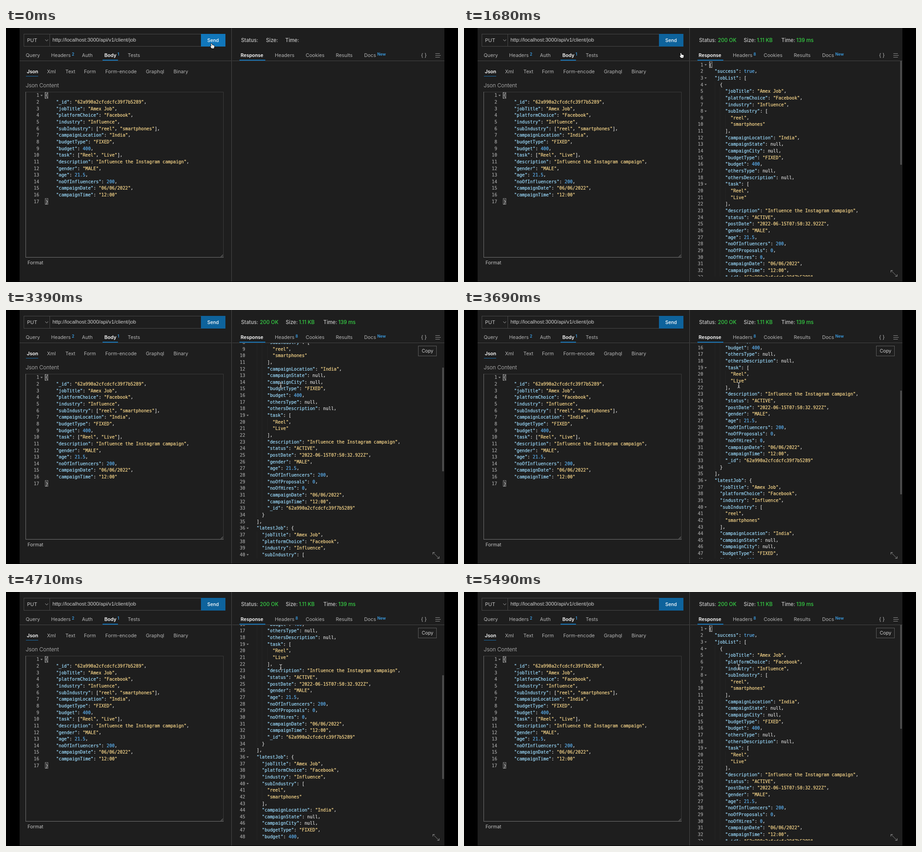
An HTML page with a canvas that plays this animation: 997x561 px, repeating every 5.97 s.

```html
<!DOCTYPE html>
<html lang="en">
<head>
<meta charset="utf-8">
<title>API client</title>
<style>
html, body { margin: 0; width: 100%; height: 100%; overflow: hidden; background: #000; }
canvas { display: block; width: 997px; height: 561px; }
</style>
</head>
<body>
<canvas id="stage" width="997" height="561"></canvas>
<script>
const ctx = document.getElementById('stage').getContext('2d');
const LOOP = 5970, STEP = 30, RESPONSE_AT = 1140;
const ROW = 14.655, CHAR = 5.87;
const UI = 'Inter, "Liberation Sans", sans-serif';
const MONO = '9.75px "DejaVu Sans Mono", monospace';
const BG = '#1e1e1e', BLUE = '#0e70b4', BADGE = '#3b9fe6', GREEN = '#36cf45';
const BUTTON = '#0e639c', BUTTON_HOVER = '#1177bb';
const KEY = '#9cdcfe', STRING = '#fbd98c', NUMBER = '#5cb0f0', PLAIN = '#dcdcdc';

const request = `{
    "_id": "62a990a2cfcdcfc39f7b5289",
    "jobTitle": "Amex Job",
    "platformChoice": "Facebook",
    "industry": "Influence",
    "subIndustry": ["reel", "smartphones"],
    "campaignLocation": "India",
    "budgetType": "FIXED",
    "budget": 400,
    "task": ["Reel", "Live"],
    "description": "Influence the Instagram campaign",
    "gender": "MALE",
    "age": 21.5,
    "noOfInfluencers": 200,
    "campaignDate": "06/06/2022",
    "campaignTime": "12:00"
}`.split('\n');

const job = {
  jobTitle: 'Amex Job', platformChoice: 'Facebook', industry: 'Influence',
  subIndustry: ['reel', 'smartphones'],
  campaignLocation: 'India', campaignState: null, campaignCity: null,
  budgetType: 'FIXED', budget: 400, othersType: null, othersDescription: null,
  task: ['Reel', 'Live'],
  description: 'Influence the Instagram campaign', status: 'ACTIVE',
  postDate: '2022-06-15T07:50:32.922Z', gender: 'MALE', age: 21.5,
  noOfInfluencers: 200, noOfProposals: 0, noOfHires: 0,
  campaignDate: '06/06/2022', campaignTime: '12:00',
  _id: '62a990a2cfcdcfc39f7b5289'
};
const response = JSON.stringify({ success: true, jobList: [job], latestJob: job }, null, 2).split('\n');

// [time, value...] points
const scrollPath = [[3060, 0], [3090, 2.4], [3240, 48], [3450, 138], [3690, 217.6], [3870, 262],
  [3960, 277], [4050, 283.7], [4380, 283.7], [4530, 268], [4710, 229.6], [4950, 128], [5190, 42], [5370, 8], [5490, 0]];
const pointerPath = [[1560, 455, 39.5], [1680, 480, 60.5], [1800, 526, 98], [1950, 584, 147], [2100, 606, 166]];

function along(path, t) {
  if (t <= path[0][0]) return path[0].slice(1);
  for (let i = 1; i < path.length; i++) {
    const a = path[i - 1], b = path[i];
    if (t <= b[0]) {
      const k = (t - a[0]) / (b[0] - a[0]);
      return a.slice(1).map((v, j) => v + (b[j + 1] - v) * k);
    }
  }
  return path[path.length - 1].slice(1);
}

function box(x, y, w, h, color) {
  ctx.fillStyle = color;
  ctx.fillRect(x, y, w, h);
}

function frame(x, y, w, h, color) {
  ctx.strokeStyle = color;
  ctx.lineWidth = 1;
  ctx.strokeRect(x, y, w, h);
}

function line(color, width, ...pts) {
  ctx.strokeStyle = color;
  ctx.lineWidth = width;
  ctx.beginPath();
  for (let i = 0; i < pts.length; i += 2) ctx.lineTo(pts[i], pts[i + 1]);
  ctx.stroke();
}

function text(str, x, y, color = '#b4b4b4', size = 10.8, weight = 400, family = UI) {
  ctx.font = `${weight} ${size}px ${family}`;
  ctx.fillStyle = color;
  ctx.fillText(str, x, y);
}

// Code text gets a hairline outline for a slightly heavier weight
function glyphs(str, x, y, color) {
  ctx.fillStyle = ctx.strokeStyle = color;
  ctx.lineWidth = 0.22;
  ctx.fillText(str, x, y);
  ctx.strokeText(str, x, y);
}

function colorOf(token, isKey) {
  if (isKey) return KEY;
  if (token[0] === '"') return STRING;
  return /^(\d|true)/.test(token) ? NUMBER : PLAIN;
}

function codeLine(str, x, y) {
  for (const m of str.matchAll(/"[^"]*"(?=(:?))|\d[\d.]*|[a-z]+|[^\w\s"]+/g)) {
    glyphs(m[0], x + m.index * CHAR, y, colorOf(m[0], m[1]));
  }
}

function editor(lines, x, y, gutter, foldable, top, bottom) {
  ctx.font = MONO;
  lines.forEach((str, i) => {
    const base = y + i * ROW;
    if (base < top - 5 || base > bottom + 12) return;
    ctx.textAlign = 'right';
    glyphs(i + 1, gutter, base, '#a3a3a3');
    ctx.textAlign = 'left';
    if (foldable(str)) {
      ctx.fillStyle = '#8c8c8c';
      ctx.beginPath();
      ctx.moveTo(gutter + 3, base - 4.6);
      ctx.lineTo(gutter + 8, base - 4.6);
      ctx.lineTo(gutter + 5.5, base - 1.6);
      ctx.fill();
    }
    codeLine(str, x, base);
  });
}

function bracketBox(x, y, caret) {
  frame(x, y, 6, 13, '#8a8a8a');
  if (caret) line('#e0e0e0', 1, x, y - 0.5, x, y + 13.5);
}

function badge(str, x) { text(str, x, 61, BADGE, 8.6, 600); }

function leftPane(hover) {
  frame(39.5, 13.5, 444, 27, '#484848');
  line('#484848', 1, 96.5, 13, 96.5, 41);
  text('PUT', 46.5, 31, '#c8c8c8', 11);
  line('#b0b0b0', 1, 86.5, 25.5, 89.8, 28.7, 93, 25.5);
  text('http://localhost:3000/api/v1/client/job', 102.5, 30, '#cecece', 11.45, 400, '"Liberation Sans", Arial, sans-serif');
  box(430, 13, 54, 28, hover ? BUTTON_HOVER : BUTTON);
  text('Send', 444, 30.7, '#fff', 10.4, 500);

  text('Query', 43.5, 64);
  text('Headers', 99.5, 64);
  badge('2', 145.3);
  text('Auth', 167.5, 64);
  text('Body', 217, 64, '#fff', 10.6, 600);
  badge('1', 246);
  text('Tests', 268.5, 64);
  box(30, 72, 467, 1, '#454545');
  box(213, 70, 34, 2, BLUE);

  text('Json', 46, 99.8, '#fff', 10.6, 600);
  text('Xml', 90.5, 99.8);
  text('Text', 131, 99.8);
  text('Form', 172, 99.8);
  text('Form-encode', 219, 99.8);
  text('Graphql', 308.5, 99.8);
  text('Binary', 369.5, 99.8);
  box(44, 106, 27, 1, '#1b6ca8');
  text('Json Content', 43.5, 131, '#c6c6c6', 11.8, 300);

  line('#3c3c3c', 1, 43, 141.5, 479.5, 141.5, 479.5, 507);
  line('#707070', 1, 43.5, 141, 43.5, 507);
  line('#747474', 1, 43, 506.5, 480, 506.5);
  line('#999', 0.8, 473.5, 505.5, 478.5, 500.5);
  line('#999', 0.8, 476, 505.5, 478.5, 503);
  bracketBox(86.5, 142.5, true);
  bracketBox(86.5, 376.5, false);
  editor(request, 87, 152.3, 73, s => s === '{', 141, 507);
  text('Format', 47.5, 521.6, '#c4c4c4', 10.5);
}

function stat(label, value, x, valueX) {
  text(label, x, 31, '#c6c6c6', 11.3, 500);
  if (value) text(value, valueX, 31, GREEN, 11.3, 500);
}

function rightPane(done) {
  stat('Status:', done && '200 OK', 518.5, 560);
  stat('Size:', done && '1.11 KB', done ? 617 : 573.5, 646);
  stat('Time:', done && '139 ms', done ? 700 : 616, 733);

  text('Response', 517.5, 64, '#fff', 10.5, 600);
  text('Headers', 593, 64);
  if (done) badge('8', 638.5);
  text('Cookies', 661, 64);
  text('Results', 727.5, 64);
  text('Docs', 790, 64);
  badge('New', 819);
  text('{ }', 915.5, 63.6, '#b8b8b8', 11);
  line('#8e8e8e', 1, 947, 56.5, 957, 56.5);
  line('#8e8e8e', 1, 947, 60.5, 959, 60.5);
  line('#8e8e8e', 1, 947, 64.5, 957, 64.5);
  box(499, 72, 468, 1, '#454545');
  box(515, 70, 57, 2, BLUE);
}

function results(scroll) {
  ctx.save();
  ctx.beginPath();
  ctx.rect(499, 73, 468, 476);
  ctx.clip();
  response.forEach((str, i) => {
    const depth = str.search(/\S/);
    for (let c = 2; c < depth; c += 2) box(Math.round(541 + c * CHAR), 73.5 + i * ROW - scroll, 1, ROW, '#252525');
  });
  bracketBox(541.5, 74.5 - scroll, true);
  editor(response, 541.1, 84.6 - scroll, 527.5, s => /[[{]$/.test(s), 73, 549);
  ctx.restore();
  box(962, 73 + scroll * 0.483, 4, 229, '#4b4b4b');
  line('#8c8c8c', 1, 942, 535.5, 955, 548.5);
  line('#8c8c8c', 1, 941.5, 540, 941.5, 535.5, 946, 535.5);
  line('#8c8c8c', 1, 955.5, 544, 955.5, 548.5, 951, 548.5);
}

function copyButton() {
  box(909, 79, 41, 23, BG);
  frame(909.5, 79.5, 40, 22, '#5c5c5c');
  text('Copy', 917, 94.2, '#cfcfcf', 10.3);
}

function hand(x, y) {
  ctx.save();
  ctx.translate(x, y);
  ctx.beginPath();
  ctx.moveTo(-2.6, -4.5);
  ctx.quadraticCurveTo(-1.5, -6, -0.6, -4.3);
  ctx.lineTo(-0.2, -1.6);
  ctx.lineTo(3.6, -0.9);
  ctx.quadraticCurveTo(4.9, -0.4, 4.6, 1.5);
  ctx.lineTo(3.5, 5.4);
  ctx.lineTo(-1.2, 5.4);
  ctx.lineTo(-4.2, 1.5);
  ctx.quadraticCurveTo(-4, 0, -2.1, 1.2);
  ctx.closePath();
  ctx.strokeStyle = '#000';
  ctx.lineWidth = 1.6;
  ctx.stroke();
  ctx.fillStyle = '#fff';
  ctx.fill();
  line('#333', 0.6, 0.4, 2, 0.4, 4.2);
  line('#333', 0.6, 2.2, 2, 2.2, 4.2);
  ctx.restore();
}

function beam(x, y) {
  for (const [color, w] of [['#111', 2.6], ['#e8e8e8', 1.1]]) {
    line(color, w, x - 3, y - 6, x - 1, y - 5.6, x, y - 4.5, x, y + 4.5, x - 1, y + 5.6, x - 3, y + 6);
    line(color, w, x + 3, y - 6, x + 1, y - 5.6, x, y - 4.5);
    line(color, w, x, y + 4.5, x + 1, y + 5.6, x + 3, y + 6);
    line(color, w, x - 1.8, y + 2, x + 1.8, y + 2);
  }
}

function draw(t) {
  const done = t >= RESPONSE_AT;
  const [x, y] = along(pointerPath, t);
  const inside = x > 499 && y > 73;
  box(0, 0, 997, 561, '#000');
  box(30, 0, 937, 560, BG);
  box(497, 0, 1, 560, '#484848');
  leftPane(y < 46);
  rightPane(done);
  if (done) results(along(scrollPath, t)[0]);
  if (done && inside) copyButton();
  (inside ? beam : hand)(x, y);
}

const start = performance.now();
function tick() {
  const t = (performance.now() - start) % LOOP;
  draw(Math.floor(t / STEP) * STEP);
  requestAnimationFrame(tick);
}
tick();
</script>
</body>
</html>
```
